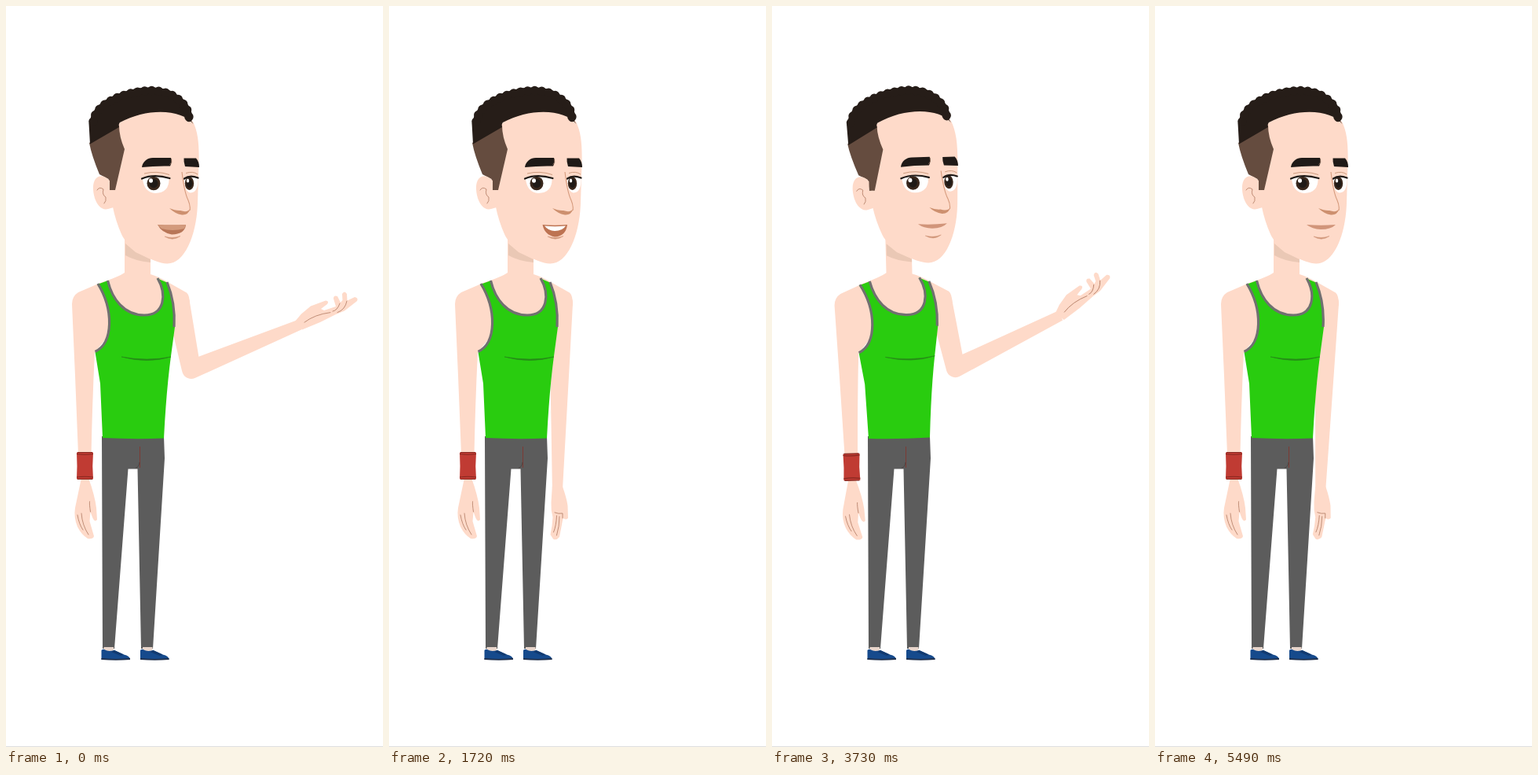
An HTML page that plays this animation: 480x942 px, repeating every 5560 ms.

```html
<!DOCTYPE html>
<html lang="en">
<head>
<meta charset="utf-8">
<title>Talking presenter</title>
<style>
  html, body { margin: 0; width: 100%; height: 100%; overflow: hidden; background: #fff; }
  svg { display: block; width: 100vw; height: 100vh; }
  .skin { fill: #fedac9; }
  .line { fill: none; stroke: #b07a62; stroke-width: .8; stroke-linecap: round; }
  .trim { fill: none; stroke: #707070; stroke-width: 3.2; }
  .ink { fill: #1f1a17; }
  .lid { fill: none; stroke: #1f1a17; stroke-width: 2.2; stroke-linecap: round; }
  .hair { fill: none; stroke: #261d18; stroke-linecap: round; }
</style>
</head>
<body>
<svg viewBox="0 0 480 942">
  <defs>
    <g id="shoe">
      <path d="M124.500 815H137V821H124.500Z" fill="#e8d5cb"/>
      <path d="M121.500 819Q124 817 126 818.500Q130 821 138 819L150 824.500Q158 826 158 831H121.500Z" fill="#164a8c"/>
      <path d="M138 819L150 824.500L146 826L134 821Z" fill="#123a70"/>
      <path d="M121.500 829Q140 831 158 829V831Q140 832.500 121.500 831Z" fill="#20304c"/>
    </g>
    <path id="crown" d="M111 147C115 120 160 107.500 186 107.500C214 108 233 126 233 143"/>
  </defs>

  <g class="tilt">
    <path id="arm" class="skin"/>
    <g id="palm">
      <path class="skin" d="M368 401L376 391.500L388 381.500L407 374.500Q412 375 409 379L401 385L405 387L420 382L417 372Q417 367 422 369L426 377L428.500 374L428 366Q431 361 434 366L434.500 374.500L444 370Q449 371 447 375L431 387.500L420 392L400 402L377 411.500Z"/>
      <path class="line" d="M380 402Q393 392 413 389.500M416 388Q422 387 425 378M422 389.500Q432 386 434 375"/>
    </g>
    <g id="hand">
      <path class="skin" d="M207.800 610L221 610Q226 624 227.500 634L228 650Q225 653 222 650L221 653L217 674Q213 679 209 676.500L205.500 671Q208 660 208.500 649Q206 640 206.500 630Z"/>
      <path class="line" d="M211 643Q216 645 221 644V650M213.500 647Q213 660 209.500 668M217 648Q217 661 213.500 672"/>
    </g>
  </g>

  <path d="M122 547H201L202 575L187 817H172L167.500 588.500H155.500L138 817H123Z" fill="#5c5c5c"/>
  <path d="M170.500 560V587" stroke="#7c3a34" fill="none"/>
  <path d="M165 587Q169 587 170 580" stroke="#473f3c" fill="none" stroke-width=".8"/>
  <use href="#shoe"/>
  <use href="#shoe" x="49.500"/>

  <g class="tilt">
    <path class="skin" d="M151 290H184V341Q194 344 206 351L230 364.500Q234 368 234 380L214 420H130L113 440Q110 500 108.500 570H92L88 470L84 379Q84 369 92 364L120 352Q144 344 151 339Z"/>
    <path class="skin" d="M96 600H105Q113 622 115 638L116 653Q113 657 110 650L107.500 643L106.500 655L112 674Q111 678 104 677Q96 672 91 662Q86 650 88 638Z"/>
    <path class="line" d="M91 647Q93 659 98 666M96 645Q97 660 105 672M107.500 643Q106 633 106.500 630"/>
    <path d="M90 567.500H111Q109.500 585 111 601.500H90Q91 585 90 567.500Z" fill="#c03b33"/>
    <path d="M90 569.500Q100 571 111 569.500M90 599Q100 597.500 111 599M91 567.500H110M91 601.500H110" fill="none" stroke="#85271f" stroke-width="1.200"/>

    <path d="M116 354L130 349C135 372 150 393 176 393C202 393 205 367 192 346L206 352C212 368 216 385 215 408L210 445Q204 490 201 549.500Q162 551 123 549L120 480L113.500 440C136 428 137 386 116 354Z" fill="#29cc0f"/>
    <path class="trim" d="M129.500 349C135 372 150 393 176 393C202 393 205 367 193 346M117 353C137 386 137 428 113.500 439.500M205 351C212 368 215.500 385 214 408"/>
    <path d="M147 446Q180 452 210 446Q180 455 147 446Z" fill="#268a18" stroke="#268a18" stroke-width=".6"/>

    <path d="M152 302L165 313L184 322V326Q164 324 152 317Z" fill="#eac8b5"/>
    <path class="skin" d="M143 150Q190 105 238 147C245 161 246 178 245.500 200L244 250C243 290 228 328 205 327.500C187 327 154 307 147 290Q138 270 134 245L132 220Z"/>
    <path d="M106 174L144 152Q144 166 151 182L139 234H132L130.500 220L119 214Q109 190 106 174Z" fill="#654c3f"/>
    <path class="skin" d="M132 222C122 211 110 216 111 233C112 250 121 261 130 258L137 256V234H132Z"/>
    <path class="line" d="M116 234Q119 229 124 233Q122 240 127 243Q128 248 125 251"/>
    <path d="M107 175.500L105.500 149L110 146C115 120 160 107 186 107C214 108 234 126 234 143L238.500 150C224 131 180 129 145 148Q143 150 144 154Z" fill="#261d18"/>
    <use href="#crown" class="hair" stroke-width="8.500"/>
    <use href="#crown" class="hair" stroke-width="11.500" stroke-dasharray="0 9"/>

    <path class="ink" d="M173 205C174 197 181 192.500 188 193H210Q212 198 209 203.500Q190 203 173 205ZM226.500 193.500H242Q246 198 246 205L228 204Q226 198 226.500 193.500Z"/>
    <path d="M210.500 194Q212 199 208.500 202" fill="none" stroke="#8c6b58" stroke-width=".8"/>
    <path d="M174 220Q190 212 207.500 219.500Q208 237.500 190 238Q176 237 174 220Z" fill="#fff"/>
    <path d="M227 220Q235 213 244.500 219Q245 237 235 237.500Q227 236 227 220Z" fill="#fff"/>
    <ellipse cx="188" cy="225.500" rx="8.500" ry="8.700" fill="#39271c"/>
    <ellipse cx="233.500" cy="225.500" rx="5.700" ry="8.500" fill="#39271c"/>
    <ellipse class="ink" cx="188" cy="225.500" rx="5.300" ry="5.800"/>
    <ellipse class="ink" cx="233.500" cy="225.500" rx="3.700" ry="5.500"/>
    <ellipse cx="184.500" cy="222" rx="2.500" ry="2.700" fill="#fff"/>
    <ellipse cx="231.500" cy="222" rx="1.700" ry="2.500" fill="#fff"/>
    <path class="lid" d="M173 219.500Q188 213 208.500 219M227 219.500Q234 214.500 244.500 218.500"/>
    <path d="M176 213Q192 209 208 214.500M229 212.500Q238 209.500 244 214" fill="none" stroke="#c79576" stroke-width=".9"/>
    <path d="M224 211Q227 237 232 247Q235 254 234 260" fill="none" stroke="#d59a7c" stroke-width="1.100"/>
    <path d="M208 257Q216 260.500 222 260Q231 263 234.500 258Q232 266 224 265.500Q215 264 208 257Z" fill="#cd906f"/>

    <path d="M202 293Q212 299.500 222 292.500Q212 296 202 293Z" fill="#cf9578" stroke="#cf9578" stroke-width=".5"/>
    <g class="mouth" id="C">
      <path d="M193 278Q211 279.500 230 278Q224 284 211 284Q200 283.500 193 278Z" fill="#d1957a"/>
    </g>
    <g class="mouth" id="S">
      <path d="M192 278Q211 279 230 278Q228 286 211 286.500Q198 285 192 278Z" fill="#d99d80"/>
      <path d="M199 283.500Q212 286 226 283.500Q221 287 211 287Q204 286.500 199 283.500Z" fill="#b5694d"/>
    </g>
    <g class="mouth" id="H">
      <path d="M193 278Q211 279 229 278Q228 290 211 290.500Q198 288 193 278Z" fill="#b87658"/>
      <path d="M193 278Q211 279 229 278L227 283Q212 287 198 283Z" fill="#d39a7c"/>
    </g>
    <g class="mouth" id="T">
      <path d="M195.500 278Q211 279.500 227 278Q225 293 211 293.500Q198 291 195.500 278Z" fill="#bd7352"/>
      <path d="M198 279.500Q211 281 225 279.500Q221 286 211 286Q203 286 198 279.500Z" fill="#fff"/>
    </g>
  </g>
  <path d="M0 941.500H480" stroke="#dedede"/>
</svg>
<script>
// All motion is counted in steps, the rate at which the picture advances.
const LOOP = 5560, STEPS = 82;
const DROP = 14.2, DROP_AGAIN = 75.2, LIFT = 50.4, PEAK = 55;
const RAISED = { upper: 78.6, fore: -22.4 }, HANGING = 91.1;
const SHOULDER = [219, 378], UPPER = 85.7, FORE = 149.3;
const TALK = "HCTHS"; // Half, Closed, Teeth, Small

const $ = id => document.getElementById(id);
const leaning = document.querySelectorAll(".tilt");
const mouths = document.querySelectorAll(".mouth");

const mix = (a, b, k) => a + (b - a) * k;
const bump = (s, at) => Math.exp(-(((s - at) / 1.5) ** 2));

function ease(s, from, length) {
  const k = Math.min(1, Math.max(0, (s - from) / length));
  return (1 - Math.cos(Math.PI * k)) / 2;
}

function along([x, y], length, degrees) {
  const r = degrees * Math.PI / 180;
  return [x + length * Math.cos(r), y + length * Math.sin(r)];
}

// Tapered limb piece with a round start
function limb(a, ra, b, rb, angle) {
  const p = [along(a, ra, angle - 90), along(b, rb, angle - 90),
    along(b, rb, angle + 90), along(a, ra, angle + 90)];
  return `M${p[0]}L${p[1]}L${p[2]}L${p[3]}A${ra} ${ra} 0 0 1 ${p[0]}Z`;
}

function place(el, [x, y], turn, homeX, homeY, shown) {
  el.style.display = shown ? "" : "none";
  el.setAttribute("transform", `translate(${x} ${y}) rotate(${turn}) translate(${-homeX} ${-homeY})`);
}

function drawArm(s) {
  const down = ease(s, DROP, 4.3) - ease(s, LIFT, 4.6) + ease(s, DROP_AGAIN, 4.3);
  const flick = bump(s, PEAK);
  const settle = 0.9 * (bump(s, DROP + 5.8) + bump(s, DROP_AGAIN + 5.8));
  // The upper arm follows only at the end of the drop.
  const upper = mix(RAISED.upper, HANGING, down ** 12) + settle;
  const fore = mix(RAISED.fore, HANGING, down) + settle - 2.6 * flick;
  const turn = -10 * Math.sin(Math.PI * down) - 10.6 * flick;

  const elbow = along(SHOULDER, UPPER, upper);
  const wrist = along(elbow, FORE, fore);
  $("arm").setAttribute("d",
    limb(SHOULDER, 15, elbow, 12, upper) + limb(elbow, 12, wrist, 6.6, fore));
  const open = fore < 45;
  place($("palm"), wrist, fore - RAISED.fore + turn, 374, 405, open);
  place($("hand"), wrist, fore - HANGING + turn, 214.5, 612, !open);
}

function draw(ms) {
  const s = Math.min(STEPS - 1, Math.floor(ms * STEPS / LOOP + 0.06));
  drawArm(s);

  const lean = -1.5 * (ease(s, PEAK - 12, 12) - ease(s, PEAK, 5)) + 0.15 * bump(s, DROP + 3.8);
  leaning.forEach(g => g.setAttribute("transform", `rotate(${lean} 162 549)`));

  const quiet = (s > 45 && s < 60) || s > 78;
  const mouth = quiet ? "C" : TALK[(s >> 1) % TALK.length];
  mouths.forEach(g => g.style.display = g.id === mouth ? "" : "none");
}

const start = performance.now();
function tick() {
  draw((performance.now() - start) % LOOP);
  requestAnimationFrame(tick);
}
tick();
</script>
</body>
</html>
```
